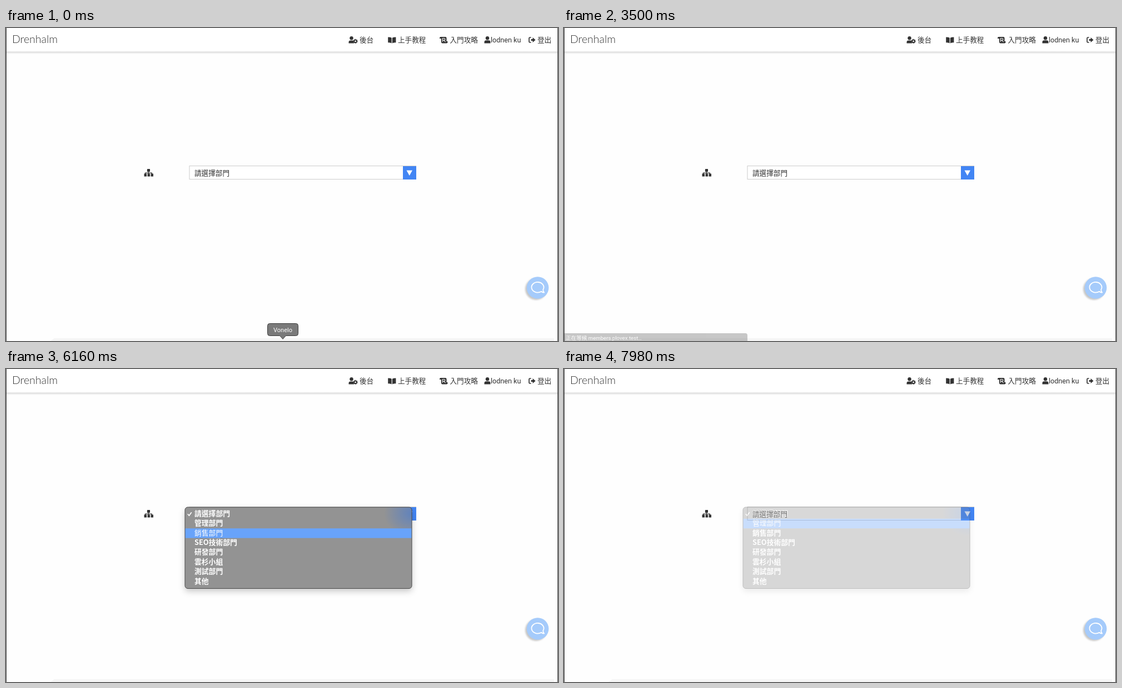
Write an HTML page that moves like this. It is 993 by 564 pixels and loops after 8000 ms.

```html
<!DOCTYPE html>
<html lang="zh-Hant">
<head>
<meta charset="utf-8">
<style>
  html, body { margin: 0; width: 100%; height: 100%; overflow: hidden; background: #fefefe; }
  svg { display: block; width: 100%; height: 100%; }
  text { font: 12.6px "Noto Sans CJK TC", "Noto Sans CJK", sans-serif; fill: currentColor; }
  .latin { font-family: Roboto, "Liberation Sans", sans-serif; }
  .brand { font: 300 19.5px Lato, sans-serif; }
  .panel { filter: drop-shadow(0 5px 6px rgba(0, 0, 0, .22)); }
  .option { font-size: 12.8px; font-weight: 600; }
</style>
</head>
<body>
<svg viewBox="0 0 993 564" color="#333">
  <defs>
    <linearGradient id="headerShade" x2="0" y2="1">
      <stop stop-color="#d2d2d2"/><stop offset="1" stop-color="#fefefe"/>
    </linearGradient>
    <radialGradient id="blueGlow">
      <stop stop-color="#3f78d8" stop-opacity=".6"/><stop offset="1" stop-color="#3f78d8" stop-opacity="0"/>
    </radialGradient>
    <filter id="soft" x="-50%" y="-50%" width="200%" height="200%"><feGaussianBlur stdDeviation="1.5"/></filter>
    <clipPath id="popupClip"><rect x="322" y="249" width="408" height="146" rx="5"/></clipPath>
  </defs>

  <rect width="993" height="564" fill="#fefefe"/>
  <path d="M80 564l7-5H986v5z" fill="#f5f5f5"/>

  <!-- department picker -->
  <g fill="#333">
    <path d="M254 254h5v5h-2v1.5h6v2.5h-1.4v-1.2H257v1.2h-1.2v-1.2h-4.6v1.2h-1.4v-2.5h6V259h-2z"/>
    <path d="M248.5 262.5h4.5v5h-4.5zm6 0h4.5v5h-4.5zm6 0h4.5v5h-4.5z"/>
  </g>
  <rect x="330" y="248.5" width="407.5" height="24" fill="#fff" stroke="#ccc"/>
  <rect x="714" y="249" width="24" height="24" fill="#4285f4"/>
  <path d="M720.5 256.5h10.5l-5.25 9.5z" fill="#fff"/>
  <text x="339" y="265.5">請選擇部門</text>

  <!-- admin menu -->
  <g id="adminMenu">
    <rect class="panel" x="604" y="42" width="128" height="190" fill="#f1f1f1"/>
    <g id="adminItems" color="#000"></g>
  </g>

  <!-- header -->
  <rect x="1" y="42" width="991" height="5" fill="url(#headerShade)"/>
  <rect x="1" width="991" height="42.5" fill="#fff"/>
  <text class="brand" x="11" y="27">Drenhalm</text>
  <rect id="adminHover" x="604" width="70" height="42.5" fill="#90bffb"/>
  <g id="adminLink" fill="currentColor">
    <circle cx="621.5" cy="18.3" r="3.2"/>
    <path d="M616.5 27.5v-2q0-3 3-3h4q1.5 0 2.2 1l-.5 2 1.2 2z"/>
    <circle cx="628.6" cy="23.8" r="2.4" fill="none" stroke="currentColor" stroke-width="2"/>
    <circle cx="628.6" cy="23.8" r="3.6" fill="none" stroke="currentColor" stroke-width="1" stroke-dasharray="1.9 1.87"/>
    <text x="636" y="26">後台</text>
  </g>
  <g fill="#333">
    <path d="M687.2 16.5q4-.4 6.5 1.2v9.8q-2.500-1.500-6.500-1.300zm14.200 0q-4-.4-6.500 1.200v9.800q2.500-1.500 6.500-1.300z"/>
    <text x="705" y="26">上手教程</text>
    <path d="M780 18q0-2 2-2h8.500q2 0 2 2v6h2v1.500q0 2-2 2h-7.500q-2 0-2-2V19H780z"/>
    <path d="M785.500 25V18.500h2.500q1.800 0 1.800 1.800t-1.800 1.800h-2.500m2.500 0l2.500 3" fill="none" stroke="#fff" stroke-width="1.100"/>
    <text x="798.500" y="26">入門攻略</text>
    <circle cx="866" cy="18.200" r="3.200"/>
    <path d="M860.500 27.500v-2q0-3.200 3.200-3.200h4.600q3.200 0 3.200 3.200v2z"/>
    <text class="latin" x="872" y="26">lodnen ku</text>
    <path d="M944.500 17h-2q-1.500 0-1.500 1.500v6q0 1.500 1.500 1.500h2" fill="none" stroke="#333" stroke-width="1.700"/>
    <path d="M944.500 20h3v-3l5 4.500-5 4.500v-3h-3z"/>
    <text x="956" y="26">登出</text>
  </g>

  <!-- chat button -->
  <circle cx="953.500" cy="470.500" r="19.500" fill="#000" opacity=".22" filter="url(#soft)"/>
  <circle cx="956.500" cy="468" r="19.800" fill="#a5cbfb"/>
  <path d="M963 474.700A11 9.300 0 1 1 966.200 471.500Q966 474.500 968 476.500Q965 477 963 474.700Z" fill="none" stroke="#fff" stroke-width="1.800" stroke-linejoin="round"/>

  <!-- dock label -->
  <g id="dockLabel">
    <path d="M474.500 532.500h47q4 0 4 4v14q0 4-4 4h-18l-5.500 6-5.500-6h-18q-4 0-4-4v-14q0-4 4-4z" fill="#7a7a7a" stroke="#3c3c3c"/>
    <text class="latin" x="498" y="547.500" text-anchor="middle" color="#fff" style="font-size:11px">Vonelo</text>
  </g>

  <!-- browser status -->
  <g id="status">
    <path d="M0 550H326q4 0 4 4v10H0z" fill="#777"/>
    <text class="latin" x="3" y="562" color="#fff" style="font-size:9.600px">正在等候 members.plovex.test…</text>
  </g>

  <!-- open department list -->
  <g id="popup">
    <rect class="panel" x="322" y="249" width="408" height="146.500" rx="5" fill="#939393"/>
    <g clip-path="url(#popupClip)">
      <ellipse cx="730" cy="260" rx="50" ry="42" fill="url(#blueGlow)"/>
      <rect id="marker" x="322" width="408" height="17.400" fill="#68a3fa"/>
    </g>
    <rect x="322" y="249" width="408" height="146.500" rx="5" fill="none" stroke="#4a4a4a"/>
    <path d="M326.800 261.300l2.600 2.900 4.300-6" fill="none" stroke="#fff" stroke-width="1.700"/>
    <g id="options" color="#fff"></g>
  </g>

  <path d="M.5 0V564M992.500 0V564" stroke="#4a4a4a"/>
</svg>
<script>
const LOOP = 8000, ROW = 17.4;
const $ = id => document.getElementById(id);

function addLines(group, lines, x, y, step, className = '') {
  group.innerHTML = lines.map((line, i) =>
    `<text class="${className}" x="${x}" y="${y + i * step}">${line}</text>`).join('');
}
addLines($('adminItems'),
  ['管理流程項目', '指定部門流程', '指定新人流程', '教程學習管理', '部門管理', '人員管理'], 616.5, 63.3, 31.6);
addLines($('options'),
  ['請選擇部門', '管理部門', '銷售部門', 'SEO技術部門', '研發部門', '雲杉小組', '測試部門', '其他'], 339, 264.7, ROW, 'option');

// [time, highlighted row]
const pointer = [[3850, 0], [4130, 1], [4410, 2], [4830, 3], [5180, 4], [5810, 3], [6160, 2], [6510, 1]];

const ramp = (t, from, to) => Math.min(1, Math.max(0, (t - from) / (to - from)));
const within = (t, from, to) => t >= from && t < to;
const show = (id, opacity) => $(id).setAttribute('opacity', opacity);

function draw(t) {
  show('dockLabel', 1 - ramp(t, 70, 350));

  const menuOpen = within(t, 1400, 2240);
  show('adminMenu', +menuOpen);
  show('adminHover', +menuOpen);
  $('adminLink').setAttribute('color', menuOpen ? '#fff' : '#333');

  show('status', ramp(t, 2730, 2870) * (1 - ramp(t, 3400, 3570)));

  show('popup', t < 3850 ? 0 : 1 - ramp(t, 7870, 8042));
  const row = pointer.reduce((current, [time, next]) => t >= time ? next : current, 0);
  $('marker').setAttribute('y', 252.4 + row * ROW);
  [...$('options').children].forEach((option, i) => option.style.fontWeight = i === row ? 400 : 600);
}

const start = performance.now();
function tick() {
  draw((performance.now() - start) % LOOP);
  requestAnimationFrame(tick);
}
tick();
</script>
</body>
</html>
```
